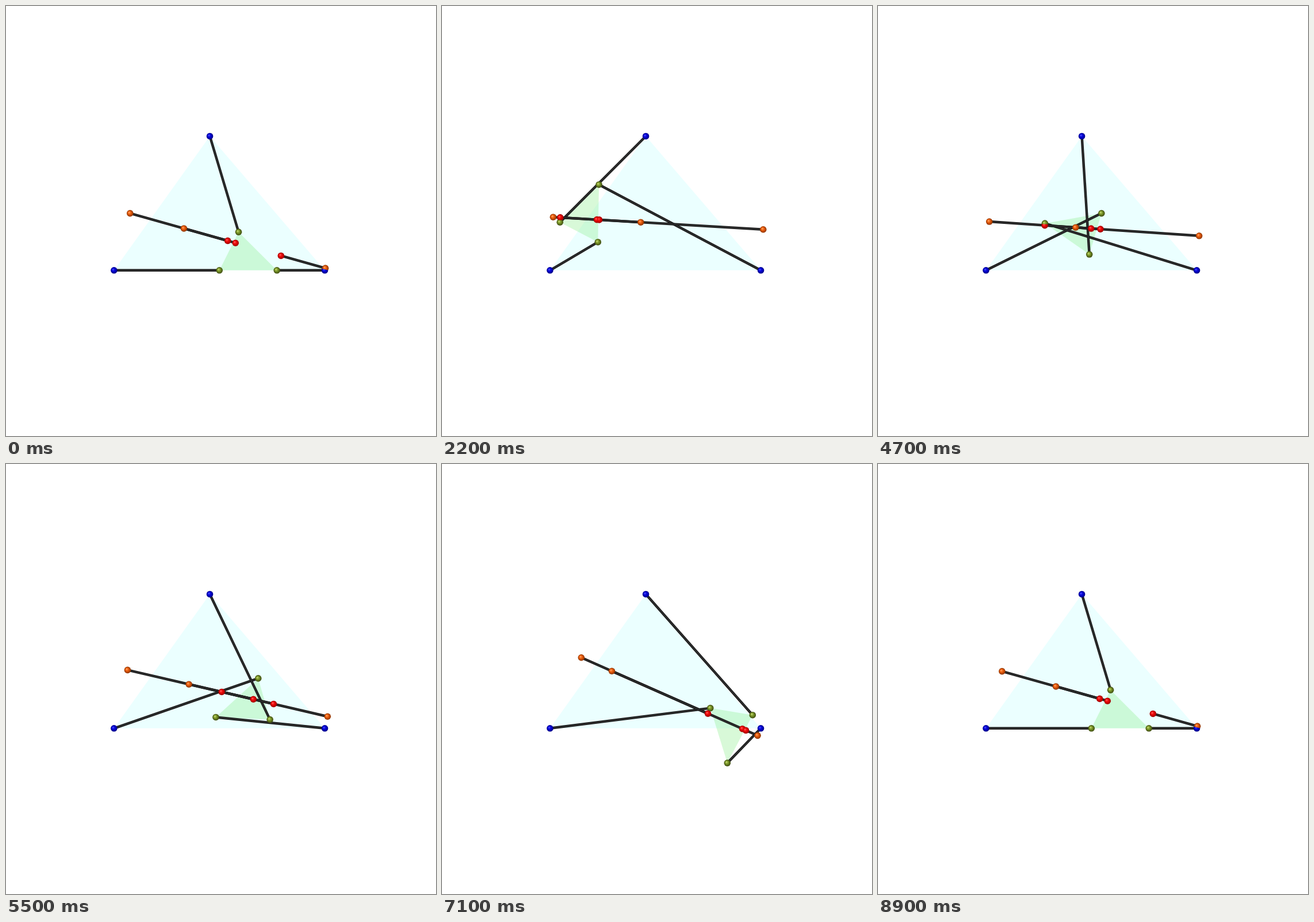
Write an HTML page with a canvas that moves like this. It is 748x748 px and loops after 9 s.

```html
<!DOCTYPE html>
<html lang="en">
<head>
<meta charset="utf-8">
<title>Planar manipulator</title>
<style>
html, body { margin: 0; width: 100%; height: 100%; overflow: hidden; background: #fff; }
canvas { display: block; width: 748px; height: 748px; }
</style>
</head>
<body>
<canvas id="stage" width="748" height="748"></canvas>
<script>
const ctx = document.getElementById('stage').getContext('2d');
const UNIT = 100 / 3, RADIUS = 5.8;
const STEP = 100, STEPS = 90;
const toPx = ([x, y]) => [187.9 + x * UNIT, 459.8 - y * UNIT];

const base = [[0, 0], [11, 0], [5, 7]].map(toPx);
const plate = [[0, 0], [3, 0], [1, 2]];

// highlight, body, rim
const BLUE = ['#5a5aff', '#0404dc', '#000084'];
const GREEN = ['#cfe07c', '#7f9c2a', '#3c4a10'];
const ORANGE = ['#ffae72', '#f0600e', '#8c3200'];
const RED = ['#ff6a6a', '#f20808', '#9c0000'];

function platformAt(phi) {
  const c = Math.cos(phi), s = Math.sin(phi);
  const ox = 5.5 - 3 * s, oy = 1.5 - 1.5 * c;
  return plate.map(([x, y]) => toPx([ox + x * c - y * s, oy + x * s + y * c]));
}

const mean = pts => [0, 1].map(k => pts.reduce((sum, p) => sum + p[k], 0) / pts.length);

// Least-squares line for the two plates and three legs together;
// returns a function that drops a point onto it.
function fitLine(platform) {
  const mid = mean([...base, ...platform]);
  const centre = p => [p[0] - mid[0], p[1] - mid[1]];
  const B = base.map(centre), P = platform.map(centre);
  let diff = 0, cross = 0;
  const add = (w, u, v) => {
    diff += w * (u[0] * v[0] - u[1] * v[1]);
    cross += w * (u[0] * v[1] + u[1] * v[0]);
  };
  B.forEach((u, i) => {
    add(1, u, u);
    add(1, P[i], P[i]);
    add(2 / 3, u, P[i]);
  });
  const g = mean(P);
  add(6, g, g);
  const angle = Math.atan2(cross, diff) / 2;
  const dx = Math.cos(angle), dy = Math.sin(angle);
  return p => {
    const [x, y] = centre(p), k = x * dx + y * dy;
    return [mid[0] + k * dx, mid[1] + k * dy];
  };
}

function triangle(pts, fill) {
  ctx.fillStyle = fill;
  ctx.beginPath();
  pts.forEach(p => ctx.lineTo(...p));
  ctx.fill();
}

function bar(p, q) {
  for (const [width, color] of [[4.4, '#181818'], [1.8, '#303030']]) {
    ctx.lineWidth = width;
    ctx.strokeStyle = color;
    ctx.beginPath();
    ctx.moveTo(...p);
    ctx.lineTo(...q);
    ctx.stroke();
  }
}

// Keeps the side of the bisector nearer to p, where two balls meet.
function clipNear(p, q, dist) {
  ctx.translate((p[0] + q[0]) / 2, (p[1] + q[1]) / 2);
  const a = Math.atan2(q[1] - p[1], q[0] - p[0]);
  ctx.rotate(a);
  ctx.beginPath();
  ctx.rect(-40, -40, 40.3, 80);
  ctx.clip();
  ctx.rotate(-a);
  ctx.translate(-(p[0] + q[0]) / 2, -(p[1] + q[1]) / 2);
}

function ball(item, all) {
  const [x, y] = item.at;
  ctx.save();
  for (const other of all) {
    const d = Math.hypot(other.at[0] - x, other.at[1] - y);
    if (d > 0.1 && d < 2 * RADIUS) clipNear(item.at, other.at);
  }
  const shade = ctx.createRadialGradient(x - 1.8, y - 1.8, 0, x, y, RADIUS);
  [0, 0.42, 1].forEach((stop, i) => shade.addColorStop(stop, item.tones[i]));
  ctx.fillStyle = shade;
  ctx.beginPath();
  ctx.arc(x, y, RADIUS, 0, 2 * Math.PI);
  ctx.fill();
  ctx.restore();
}

function draw(time) {
  const step = Math.floor(time / STEP) % STEPS;
  const platform = platformAt(2 * Math.PI * step / (STEPS - 1));
  const drop = fitLine(platform);
  const baseFeet = base.map(drop), plateFeet = platform.map(drop);

  ctx.fillStyle = '#fff';
  ctx.fillRect(0, 0, 748, 748);
  triangle(base, '#ebffff');
  triangle(platform, 'rgba(144, 238, 144, 0.35)');
  for (let i = 0; i < 3; i++) {
    bar(base[i], platform[i]);
    bar(baseFeet[i], plateFeet[i]);
  }
  const balls = [[base, BLUE], [platform, GREEN], [baseFeet, ORANGE], [plateFeet, RED]]
    .flatMap(([pts, tones]) => pts.map(at => ({ at, tones })));
  balls.forEach(item => ball(item, balls));
}

const start = performance.now();
function tick() {
  draw(performance.now() - start);
  requestAnimationFrame(tick);
}
tick();
</script>
</body>
</html>
```
